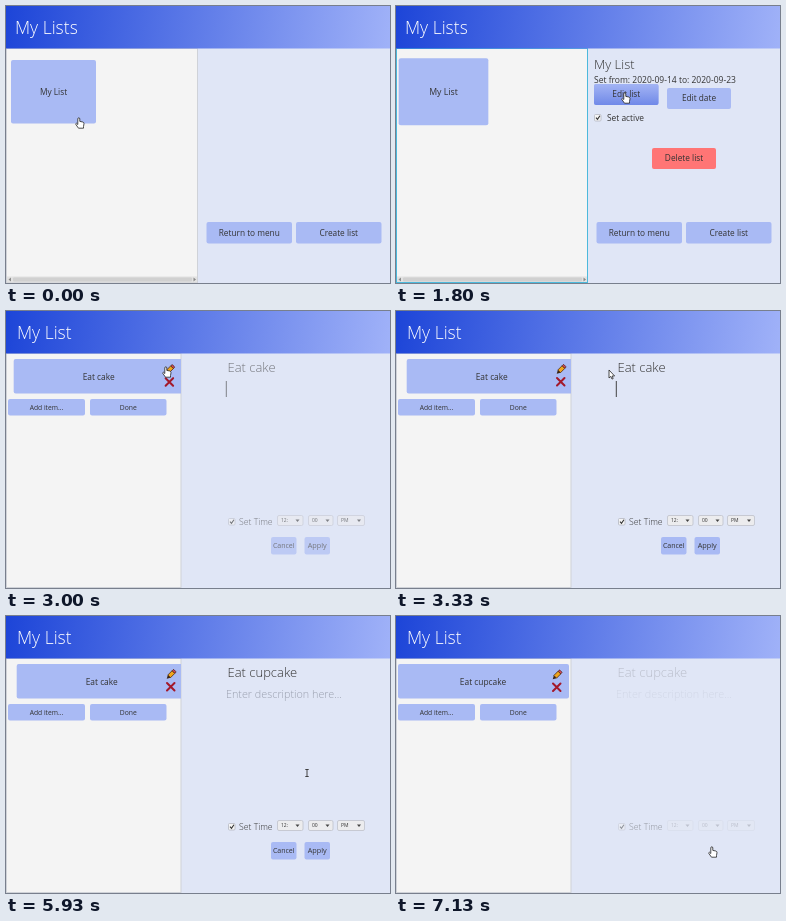
An HTML page that plays this animation: 384x277 px, repeating every 7.19 s.

```html
<!DOCTYPE html>
<html lang="en">
<head>
<meta charset="utf-8">
<title>My Lists</title>
<style>
  html, body { margin: 0; width: 100%; height: 100%; overflow: hidden; background: #e0e6f6; }
  svg { display: block; width: 384px; height: 277px; }
  text { font-family: "Open Sans", "Noto Sans", sans-serif; fill: #333; }
  .mid { text-anchor: middle; }
  .light { font-weight: 300; }
</style>
</head>
<body>
<svg id="stage" viewBox="0 0 384 277" xmlns="http://www.w3.org/2000/svg"></svg>
<script>
const LOOP = 7190;
const stage = document.getElementById('stage');

const rect = (x, y, w, h, fill, extra = '') =>
  `<rect x="${x}" y="${y}" width="${w}" height="${h}" fill="${fill}" ${extra}/>`;
const text = (x, y, size, str, extra = '') =>
  `<text x="${x}" y="${y}" font-size="${size}" ${extra}>${str}</text>`;

function button(id, x, y, w, h, label, size, fill = '#a9baf4') {
  return `<g id="${id}">${rect(x, y, w, h, fill, 'rx="2"')}
    ${rect(x, y, w, h, 'url(#hover)', 'rx="2" class="glow" opacity="0"')}
    ${text(x + w / 2, y + h / 2 + size * .36, size, label, 'class="mid"')}</g>`;
}

const checkbox = (x, y) => rect(x + .5, y + .5, 6.5, 6.5, '#f5f5f5', 'rx="1" stroke="#b5b8c2" stroke-width=".8"') +
  `<path d="M${x + 2} ${y + 3.7}l1.5 1.7 2.4-3.6" fill="none" stroke="#333" stroke-width="1.1"/>`;

const combo = (x, w, label) => rect(x + .5, 204.5, w - 1, 10, '#ececee', 'rx="1.5" stroke="#bfc2cb" stroke-width=".8"') +
  text(x + 4, 211.4, 5, label) + `<path d="M${x + w - 8} 208.5h4l-2 2.6z" fill="#444"/>`;

const header = (x, title) => rect(0, 0, 384, 42.5, 'url(#head)') +
  text(x, 28, 17.5, title, 'class="light" style="fill:#fff"');

const panel = w => rect(.5, 42.5, w - 1, 234, '#f4f4f4', 'stroke="#cfd2d8"');

const listsScreen = `<g id="lists">
  ${panel(192)}
  ${rect(1, 270.5, 190, 6, '#e2e2e2')}${rect(7, 271.5, 179, 4, '#d0d0d0', 'rx="1"')}
  <path d="M5 271.5l-2.5 2 2.5 2zM187.500 271.500l2.500 2-2.500 2z" fill="#8a8a8a"/>
  ${rect(.5, 42.5, 191, 234, 'none', 'id="focus" stroke="#4cb9dc"')}
  ${header(9, 'My Lists')}
  ${button('card', 5, 54, 85, 63.5, 'My List', 8.3)}
  <g id="details">
    ${text(198, 63, 13, 'My List', 'class="light"')}
    ${text(198, 76.500, 8.5, 'Set from: 2020-09-14 to: 2020-09-23')}
    ${button('editList', 198, 82, 64.5, 21, 'Edit list', 8.3)}
    ${button('editDate', 271, 82, 64, 21, 'Edit date', 8.3)}
    ${checkbox(198, 108)}${text(211, 115, 8.4, 'Set active')}
    ${button('del', 256, 142, 64, 21, 'Delete list', 8.3, '#ff7575')}
  </g>
  ${button('back', 200.5, 216, 85.5, 21.5, 'Return to menu', 8.3)}
  ${button('create', 290, 216, 85.5, 21.5, 'Create list', 8.3)}
</g>`;

const pencil = `<g transform="translate(161 59) rotate(45)">
  ${rect(-1.9, -5.5, 3.8, 2.2, '#d8475a', 'rx=".8" stroke="#40200f" stroke-width=".7"')}
  ${rect(-1.9, -3.4, 3.8, 6, '#f0a51c', 'stroke="#40200f" stroke-width=".7"')}
  <path d="M-1.900 2.600h3.800L0 6z" fill="#3a2410"/></g>`;
const cross = '<path d="M157 67.500l7.500 7.500M164.500 67.500l-7.500 7.500" stroke="#a3182a" stroke-width="2" stroke-linecap="round"/>';

const itemScreen = `<g id="items">
  ${panel(175.5)}
  <g clip-path="url(#left)">
    <g id="item">${rect(2, 48, 171, 34.5, '#a9baf4', 'rx="2"')}
      ${text(87, 68.5, 8.4, '', 'class="mid" id="itemName"')}</g>
    <g id="icons">${pencil}${cross}</g>
    ${button('add', 2, 88, 77, 16.5, 'Add item...', 6.7)}
    ${button('done', 84, 88, 76.5, 16.5, 'Done', 6.8)}
  </g>
  ${header(11, 'My List')}
  <g id="editor">
    <text id="name" x="221.500" y="61" font-size="13" class="light"></text>
    ${text(220, 82, 10.8, 'Enter description here...', 'id="prompt" class="light" style="fill:#999fae"')}
    ${rect(219.8, 70, 1, 16, '#444', 'id="descCaret"')}
    ${rect(0, 49.5, 1, 14, '#444', 'id="nameCaret"')}
    ${combo(271, 26.5, '12:')}${combo(302, 25.5, '00')}${combo(331, 28, 'PM')}
    <g id="buttons">${button('cancel', 265, 226, 25.5, 17.5, 'Cancel', 7)}
      ${button('apply', 298.5, 226, 25.5, 17.5, 'Apply', 7.3)}</g>
  </g>
  <g id="setTime">${checkbox(222, 207)}${text(233, 213.500, 8.7, 'Set Time', 'class="light"')}</g>
</g>`;

const cursors = `<g id="cursor">
  <path id="hand" d="M-2.200 1.500V-4q0-1.200 1-1.200t1 1.200v2.400l3 .6q1.300.4 1.200 1.700l-.5 2.800v1.700h-5L-4 1.700q-.7-1.200.4-1.500z" fill="#fff" stroke="#222" stroke-width=".8" stroke-linejoin="round"/>
  <path id="arrow" d="M-2-4v8l1.800-1.600L1 5.100l1.200-.6L1.100 2h2.500z" fill="#fff" stroke="#222" stroke-width=".8"/>
  <path id="beam" d="M-1.700-3.500h3.400M0-3.500v7M-1.700 3.500h3.400" fill="none" stroke="#333" stroke-width=".9"/>
</g>`;

stage.innerHTML = `<defs>
  <linearGradient id="head" gradientUnits="userSpaceOnUse" x1="0" y1="0" x2="382" y2="42">
    <stop stop-color="#1d45d8"/><stop offset="1" stop-color="#9fb1f8"/></linearGradient>
  <linearGradient id="hover" x2="0" y2="1">
    <stop stop-color="#a3b4f4"/><stop offset="1" stop-color="#7089e8"/></linearGradient>
  <clipPath id="left">${rect(0, 43, 175, 234, '#000')}</clipPath>
</defs>${rect(0, 0, 384, 277, '#e0e6f6')}${listsScreen}${itemScreen}${cursors}`;

const el = {};
stage.querySelectorAll('[id]').forEach(n => el[n.id] = n);

// time, x, y of the pointer
const path = [
  [0, 74, 117], [70, 74, 117], [400, 57, 91], [1130, 57, 91], [1770, 230, 92],
  [2440, 230, 92], [2600, 152, 84], [2740, 161, 61], [3130, 161, 61], [3330, 215, 63],
  [3760, 246, 58], [5640, 246, 58], [5930, 301, 157], [6300, 317, 236], [LOOP, 317, 236]
];

const ease = p => p * p * (3 - 2 * p);
const ramp = (t, start, len) => ease(Math.min(1, Math.max(0, (t - start) / len)));
const show = (id, on) => el[id].style.display = on ? '' : 'none';
const fade = (id, v) => el[id].setAttribute('opacity', v);
const move = (id, x, y) => el[id].setAttribute('transform', `translate(${x} ${y})`);

function pointer(t) {
  const i = Math.max(1, path.findIndex(k => k[0] > t));
  const [t0, x0, y0] = path[i - 1], [t1, x1, y1] = path[i];
  const p = ramp(t, t0, t1 - t0);
  return [x0 + (x1 - x0) * p, y0 + (y1 - y0) * p];
}

function hover(id, t, start, end, rise = 4, scale = '') {
  const v = ramp(t, start, 120) * (1 - ramp(t, end, 120));
  el[id].setAttribute('transform', `translate(0 ${-rise * v}) ${scale}`);
  el[id].querySelector('.glow').setAttribute('opacity', v);
}

function draw(t) {
  show('lists', t < 2070);
  show('items', t >= 2070);

  // lists screen
  show('focus', t >= 650);
  fade('details', ramp(t, 640, 240));
  const grow = 1 + .055 * ramp(t, 630, 120);
  hover('card', t, 130, 1360, 4.5,
    `translate(47.3 85.7) scale(${grow}) translate(-47.3 -85.7)`);
  hover('editList', t, 1640, 2070);

  // items screen
  const slide = ramp(t, 2850, 250) * (1 - ramp(t, 6700, 250));
  move('item', 8.7 * slide, 0);
  move('icons', 4 * slide, -.5 * slide);
  el.itemName.textContent = t < 6680 ? 'Eat cake' : 'Eat cupcake';
  hover('done', t, 2530, 2580, 3);
  hover('apply', t, 6230, 6700, 3);

  const open = ramp(t, 2850, 260);
  const out = ramp(t, 6680, 560);
  fade('editor', open * (1 - out * .87));
  fade('setTime', open * (1 - out * .6));
  fade('buttons', 1 - ramp(t, 6700, 350));

  const typed = 'cup'.slice(0, [4470, 4670, 5070].filter(k => t >= k).length);
  el.name.textContent = `Eat ${typed}cake`;
  const inName = t >= 3930 && t < 5800;
  const inDesc = t >= 2850 && t < 3930;
  show('prompt', !inDesc);
  show('descCaret', inDesc);
  show('nameCaret', inName);
  if (inName) el.nameCaret.setAttribute('x', 221.500 + el.name.getSubStringLength(0, 4 + typed.length));

  const [x, y] = pointer(t);
  move('cursor', x, y);
  const beam = t >= 3400 && t < 6200;
  const arrow = t >= 2070 && t < 2500 || t >= 3200 && t < 3400;
  show('beam', beam);
  show('arrow', arrow);
  show('hand', !beam && !arrow);
}

const begin = performance.now();
function tick() {
  draw((performance.now() - begin) % LOOP);
  requestAnimationFrame(tick);
}
tick();
</script>
</body>
</html>
```
